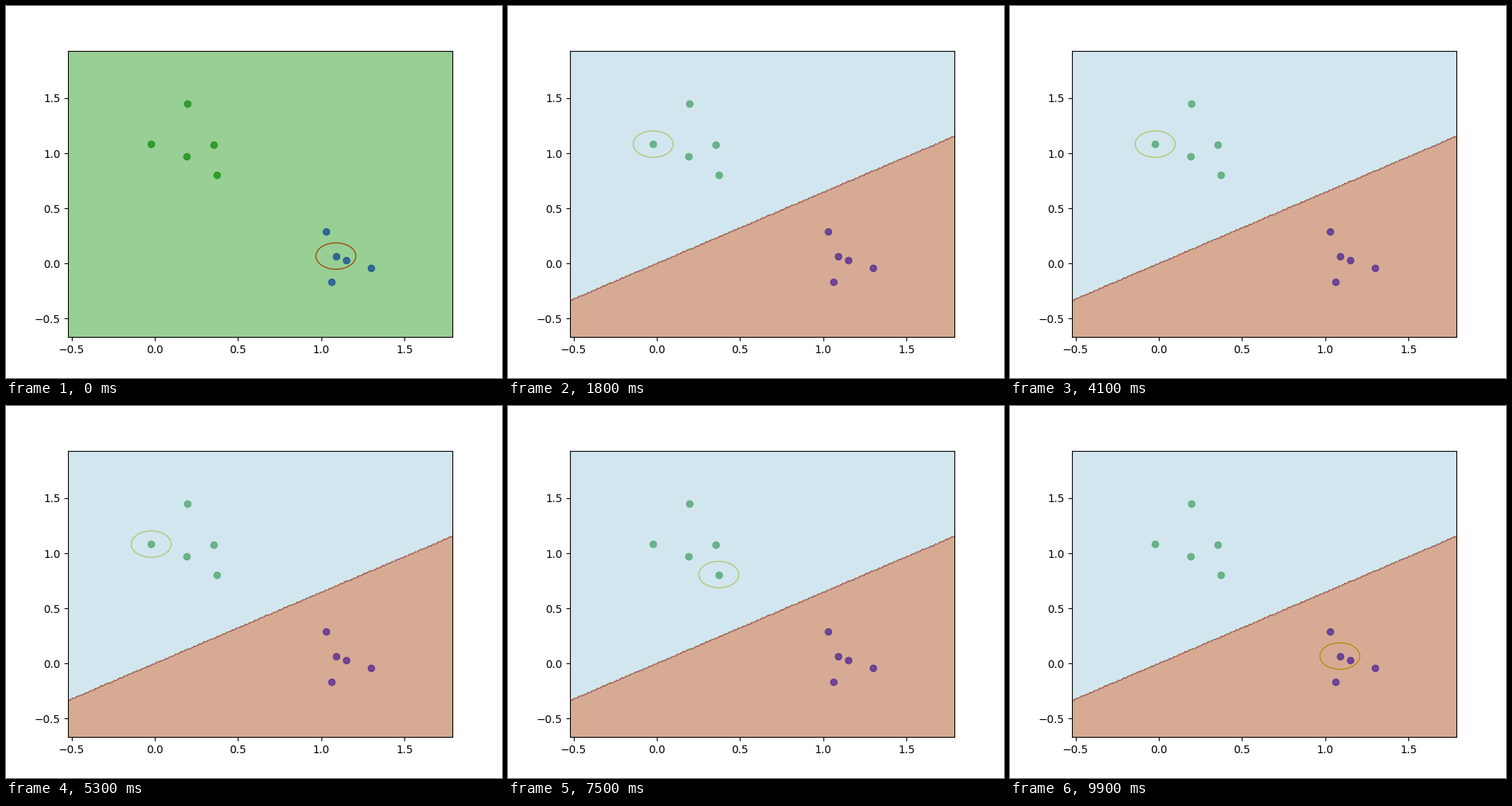
A matplotlib script that plays this animation: 640 px wide and 480 px high, repeating every 10000 ms.

```python
import matplotlib.pyplot as plt
import numpy as np
from matplotlib.animation import FuncAnimation

# Samples A-E belong to class -1, samples F-J to class +1.
X = np.array([
    (-0.0215, 1.083), (0.1956, 1.450), (0.189, 0.971), (0.352, 1.080), (0.373, 0.8065),
    (1.028, 0.2915), (1.0885, 0.067), (1.1514, 0.027), (1.2985, -0.040), (1.062, -0.1685),
])
y = np.repeat([-1, 1], 5)

# The sample visited at each training step.
VISITS = (
    "GBFDJCHAEIBD" "BHCJEFAGC" "CHAFEIGCEDFG" "JBEADFCCABB"
    "JFHDDBIEJAGCHH" "FBDAECHICGGCFJJJ" "BEAIFDDIAA" "DCGEFAEDGCCAFDEG"
)
order = ["ABCDEFGHIJ".index(c) for c in VISITS]
STEP = 0.01


def predict(w, pts):
    return np.where(pts @ w > 0, 1, -1)


def train():
    """Return the distinct weights and, per step, (weight index, missed)."""
    weights, steps = [np.zeros(2)], []
    for i in order:
        w = weights[-1]
        missed = predict(w, X[i]) != y[i]
        steps.append((len(weights) - 1, missed))
        if missed:
            weights.append(w + y[i] * X[i])
    return weights, steps


weights, steps = train()

fig, ax = plt.subplots(figsize=(6.4, 4.8), dpi=100)
for label, color in ((-1, "g"), (1, "b")):
    ax.scatter(*X[y == label].T, c=color, alpha=0.8)
marker = plt.Circle(X[0], 0.12, fill=False, edgecolor="y", zorder=0.9)
ax.add_patch(marker)

lo, hi = X.min(axis=0) - 0.5, X.max(axis=0) + 0.5
gx, gy = (a + STEP * np.arange(round((b - a - STEP / 2) / STEP)) for a, b in zip(lo, hi))
xx, yy = np.meshgrid(gx, gy)
grid = np.stack([xx, yy], axis=-1)


def draw_regions(w):
    z = predict(w, grid)
    if z.min() == z.max():
        return ax.contourf(xx, yy, z, levels=[-2, 2], colors=[plt.cm.Paired(3)], alpha=0.5)
    return ax.contourf(xx, yy, z, cmap=plt.cm.Paired, alpha=0.5)


regions = [draw_regions(w) for w in weights]
ax.set_xlim(gx[0], gx[-1])
ax.set_ylim(gy[0], gy[-1])


def update(k):
    current, missed = steps[k]
    for j, region in enumerate(regions):
        region.set_visible(j == current)
    marker.center = X[order[k]]
    marker.set_edgecolor("r" if missed else "y")
    return [marker, *regions]


anim = FuncAnimation(fig, update, frames=len(order), interval=100, repeat=True, repeat_delay=0)
plt.show()
```
